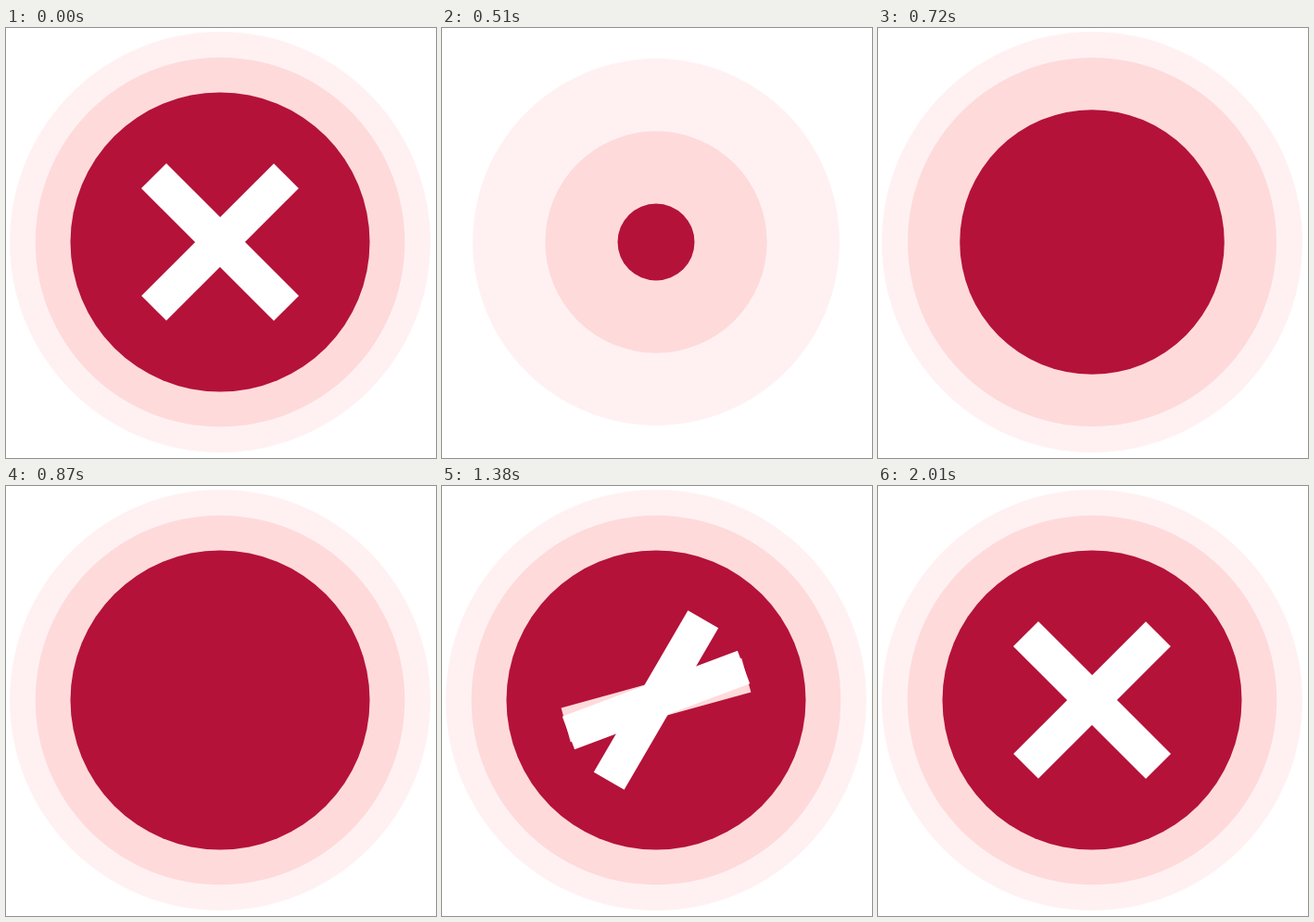
Animation, 464 px wide and 464 px high, one loop 2.25 s. Source, as an HTML page with a canvas:

```html
<!DOCTYPE html>
<html lang="en">
<head>
<meta charset="utf-8">
<title>Error cross</title>
<style>
  html, body { margin: 0; width: 100%; height: 100%; overflow: hidden; background: #fff; }
  canvas { display: block; }
</style>
</head>
<body>
<canvas width="464" height="464"></canvas>
<script>
const ctx = document.querySelector('canvas').getContext('2d');
const LOOP = 2250, HOLD = 120, SPAN = 510, CENTER = 231;
const PALE = '#fff1f2', PINK = '#fedadb', RED = '#b41239', WHITE = '#fff';

// cubic-bezier(.42, 0, .58, 1), solved by bisection
function ease(x) {
  if (x <= 0) return 0;
  if (x >= 1) return 1;
  let lo = 0, hi = 1, u;
  for (let i = 0; i < 20; i++) {
    u = (lo + hi) / 2;
    const bx = 1.26 * u * (1 - u) ** 2 + 1.74 * u * u * (1 - u) + u ** 3;
    if (bx < x) lo = u; else hi = u;
  }
  return u * u * (3 - 2 * u);
}

const progress = (t, start, span = SPAN) => ease((t - start) / span);

function disc(radius, color) {
  ctx.fillStyle = color;
  ctx.beginPath();
  ctx.arc(0, 0, radius, 0, 2 * Math.PI);
  ctx.fill();
}

function bar(degrees, scale, color) {
  ctx.save();
  ctx.rotate(degrees * Math.PI / 180);
  ctx.scale(scale, scale);
  ctx.fillStyle = color;
  ctx.fillRect(-101, -19, 202, 38);
  ctx.restore();
}

function draw(t) {
  ctx.setTransform(1, 0, 0, 1, 0, 0);
  ctx.fillStyle = WHITE;
  ctx.fillRect(0, 0, 464, 464);
  ctx.translate(CENTER, CENTER);

  disc(227 * progress(t, 128), PALE);
  disc(199.3 * progress(t, 226), PINK);
  disc(161.5 * progress(t, 332), RED);

  const scale = progress(t, 864);
  if (!scale) return;
  const base = -61 + 16 * progress(t, 1240, 730);
  const spread = time => base + 90 * progress(time, 1145);
  bar(spread(t + 17), scale, PINK); // tint runs just ahead of the opening bar
  bar(base, scale, WHITE);
  bar(spread(t), scale, WHITE);
}

const begin = performance.now();
function tick() {
  const t = (performance.now() - begin) % LOOP;
  draw(t < HOLD ? t + LOOP : t);
  requestAnimationFrame(tick);
}
tick();
</script>
</body>
</html>
```
